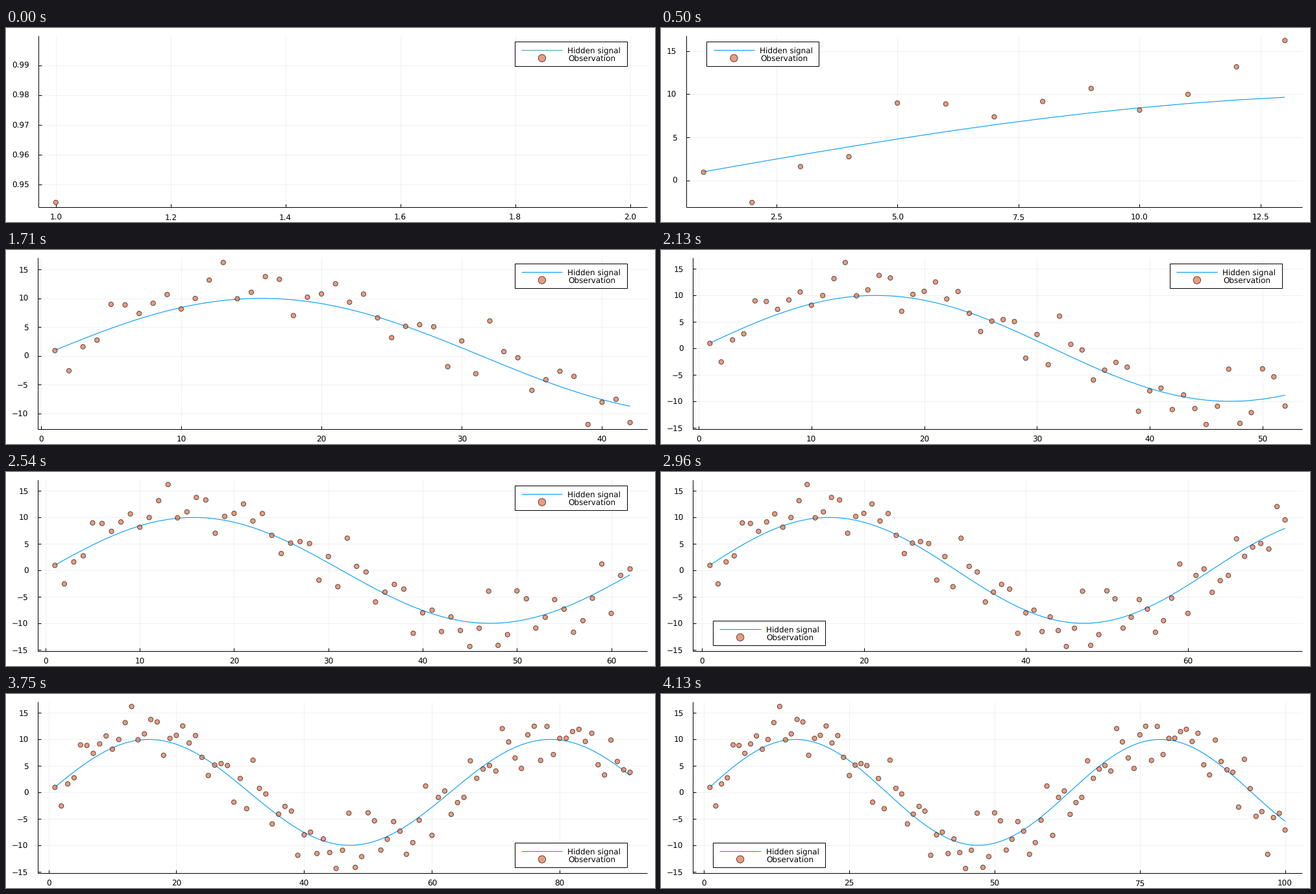
A matplotlib script that plays this animation: 1000 px wide and 300 px high, repeating every 4180 ms.

```python
import math

import numpy as np
import matplotlib.pyplot as plt
from matplotlib.animation import FuncAnimation
from matplotlib.collections import CircleCollection, LineCollection
from matplotlib.patches import Rectangle

plt.rcParams.update({"font.family": "DejaVu Sans", "text.hinting": "none"})

W, H = 1000, 300
PT = 0.72                      # points per pixel at 100 dpi
FONT = 12                      # pixels
TOP, BOTTOM, RIGHT = 11.8, 277.3, 988.2
BLUE, CORAL, TEAL = "#009af9", "#e36f47", "#4fa0a8"

# Step mantissas and how nice each one is
STEPS = [(1.0, 1.0), (5.0, 0.9), (2.0, 0.7), (2.5, 0.5), (3.0, 0.2)]

observed = np.array([
    0.944, -2.56, 1.6, 2.75, 8.97, 8.86, 7.37, 9.15, 10.66, 8.15,
    9.98, 13.17, 16.22, 9.93, 11.05, 13.77, 13.3, 7.01, 10.2, 10.77,
    12.54, 9.33, 10.73, 6.62, 3.18, 5.15, 5.44, 5.07, -1.85, 2.62,
    -3.08, 6.08, 0.76, -0.3, -5.96, -4.11, -2.65, -3.54, -11.88, -8.02,
    -7.51, -11.55, -8.79, -11.36, -14.37, -10.93, -3.93, -14.16, -12.13, -3.86,
    -5.37, -10.9, -8.86, -5.52, -7.33, -11.69, -9.49, -5.26, 1.2, -8.12,
    -0.95, 0.27, -4.15, -1.93, -0.95, 5.96, 2.65, 4.4, 5.08, 4.03,
    12.05, 9.53, 6.5, 4.52, 10.87, 12.49, 6.04, 12.46, 7.14, 10.2,
    10.23, 11.48, 11.91, 9.61, 11.16, 5.21, 3.3, 9.87, 5.83, 4.27,
    3.79, -2.78, 6.25, 0.71, -4.52, -3.63, -11.7, -4.76, -3.96, -7.11])
COUNT = len(observed)
steps = np.arange(1, COUNT + 1)
signal = 10 * np.sin(steps / 10)


def padded(lo, hi):
    if hi == lo:
        hi = lo + 1
    pad = 0.03 * (hi - lo)
    return lo - pad, hi + pad


def nice_ticks(lo, hi):
    """Score candidate steps on count, zero, coverage and niceness."""
    span = hi - lo
    best, found = -math.inf, (0, 0, 1)
    z = math.ceil(math.log10(span))
    while 160 * 10.0 ** z > span:
        for k in range(4, 17):
            for q, nice in STEPS:
                step = q * 10.0 ** z
                reach = (k - 1) * step
                if not span <= reach < 2 * span:
                    continue
                start, stop = math.ceil((hi - reach) / step), math.floor(lo / step)
                first, last = math.ceil(lo / step), math.floor(hi / step)
                size = last - first + 1
                if start > stop or not 4 <= size <= 8:
                    continue
                zero = 1.0 if start <= 0 and stop > -k else 0.0
                grain = 1 - abs(size - 5) / 5
                cover = 1.5 * span / ((size - 1) * step)
                score = 0.25 * grain + 1 / 6 * zero + 1 / 3 * cover + 0.25 * nice
                if score > best:
                    best, found = score, (first, last, step)
        z -= 1
    first, last, step = found
    return [i * step for i in range(first, last + 1)]


def tick_labels(ticks):
    digits = 0
    while any(abs(round(t, digits) - t) > 1e-9 for t in ticks):
        digits += 1
    return [f"{t:.{digits}f}".replace("-", "\u2212") for t in ticks]


def label_width(text):
    em = {".": 0.318, "\u2212": 0.838}
    return FONT * sum(em.get(c, 0.636) for c in text)


def legend_corner(u, v):
    """Emptiest corner as (right, top); u and v are 0..1 positions."""
    crowd = {}
    for right, top in [(1, 1), (0, 1), (1, 0), (0, 0)]:
        dx, dy = np.abs(u - right), np.abs(v - top)
        near = (dx <= 0.25) & (dy <= 0.25)
        crowd[right, top] = np.sum(1 / (1 + 100 * np.hypot(dx, dy)[near]))
    return min(crowd, key=crowd.get)


fig = plt.figure(figsize=(W / 100, H / 100), dpi=100, facecolor="white")
ax = fig.add_axes([0, 0, 1, 1])
ax.set_xlim(0, W)
ax.set_ylim(H, 0)
ax.axis("off")


def segments(color, z, **kw):
    item = LineCollection([], colors=color, linewidths=PT, zorder=z, **kw)
    return ax.add_collection(item, autolim=False)


def circles(radius, z):
    # Two equal colours keep sub-pixel placement
    item = CircleCollection([math.pi * (radius * PT) ** 2], offsets=np.empty((0, 2)),
                            offset_transform=ax.transData, facecolors=[CORAL] * 2,
                            edgecolors="black", linewidths=0.9 * PT, alpha=0.7, zorder=z)
    return ax.add_collection(item, autolim=False)


def stroke(z):
    return ax.plot([], [], color=BLUE, lw=1.1 * PT, zorder=z,
                   solid_capstyle="butt")[0]


def label(text="", ha="left"):
    return ax.text(0, 0, text, ha=ha, va="baseline", fontsize=FONT * PT,
                   color="black", zorder=7)


grid = segments("black", 1, alpha=0.06)
frame = segments("black", 2)
curve, dots = stroke(3), circles(3.6, 4)
box = ax.add_patch(Rectangle((0, 0), 173, 38.8, fc="white", ec="black", lw=PT, zorder=5))
key_line, key_dot = stroke(6), circles(5.7, 6)
key_texts = [label("Hidden signal"), label("Observation")]
x_texts = [label(ha="center") for _ in range(8)]
y_texts = [label(ha="right") for _ in range(8)]


def put_labels(pool, texts, spots):
    for item in pool:
        item.set_text("")
    for item, text, spot in zip(pool, texts, spots):
        item.set_text(text)
        item.set_position(spot)


def put_legend(left, right, top):
    inset = (RIGHT - left) / 30
    x = RIGHT - inset - 173 if right else left + inset
    y = TOP + 8.85 if top else BOTTOM - 8.85 - 38.8
    box.set_xy((x, y))
    key_line.set_data([x + 10.3, x + 73.5], [y + 13.2] * 2)
    key_dot.set_offsets([(x + 42, y + 26)])
    key_texts[0].set_position((x + 81.4, y + 17.5))
    key_texts[1].set_position((x + 82.6, y + 30.4))


def show(n):
    t, obs, sig = steps[:n], observed[:n], signal[:n]
    x0, x1 = padded(1, n)
    y0, y1 = padded(min(obs.min(), sig.min()), max(obs.max(), sig.max()))
    xt, yt = nice_ticks(x0, x1), nice_ticks(y0, y1)
    y_names = tick_labels(yt)
    left = 23.5 + max(map(label_width, y_names))

    def px(x):
        return left + (np.asarray(x) - x0) / (x1 - x0) * (RIGHT - left)

    def py(y):
        return BOTTOM - (np.asarray(y) - y0) / (y1 - y0) * (BOTTOM - TOP)

    xs, ys = px(xt), py(yt)
    grid.set_segments([[(x, TOP), (x, BOTTOM)] for x in xs]
                      + [[(left, y), (RIGHT, y)] for y in ys])
    frame.set_segments([[(left, BOTTOM), (RIGHT, BOTTOM)], [(left, TOP), (left, BOTTOM)]]
                       + [[(x, BOTTOM), (x, BOTTOM - 5)] for x in xs]
                       + [[(left, y), (left + 5, y)] for y in ys])
    put_labels(x_texts, tick_labels(xt), [(x, 296.6) for x in xs])
    put_labels(y_texts, y_names, [(left - 14.3, y + 4.4) for y in ys])

    curve.set_data(px(t), py(sig))
    dots.set_offsets(np.column_stack([px(t), py(obs)]))
    key_line.set_color(TEAL if n == 1 else BLUE)
    u = (np.tile(t, 2) - x0) / (x1 - x0)
    v = (np.concatenate([sig, obs]) - y0) / (y1 - y0)
    put_legend(left, *legend_corner(u, v))


shown = 0


def update(tick):
    """24 samples per second on a 10 ms clock."""
    global shown
    n = min((6 * tick + 2) // 25, COUNT - 1) + 1
    if n != shown:
        show(n)
        shown = n
    return []


def reset():
    global shown
    shown = 0
    return update(0)


anim = FuncAnimation(fig, update, frames=418, init_func=reset, interval=10,
                     repeat=True, repeat_delay=0, blit=False)
plt.show()
```
